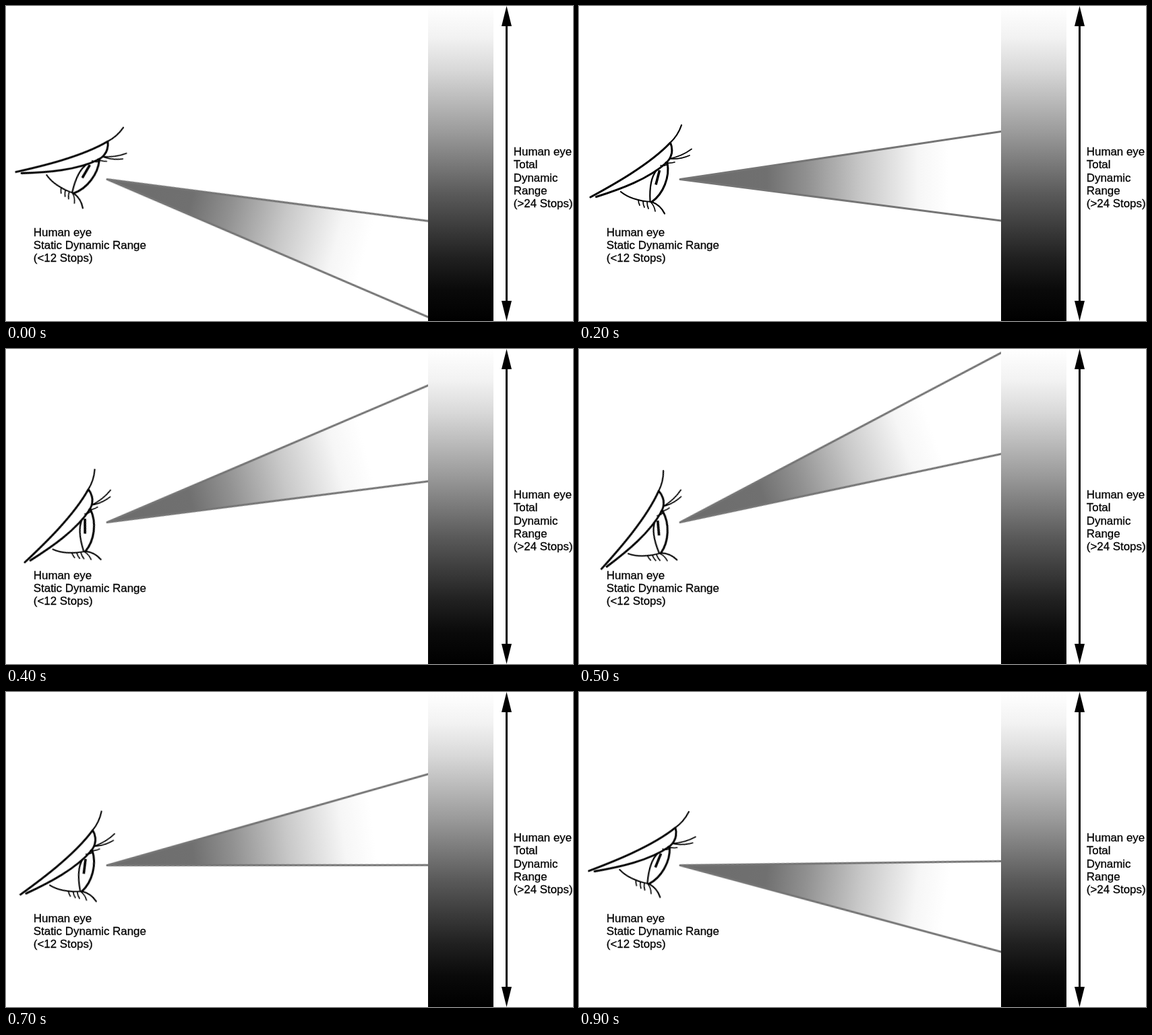
Recreate the animation shown at these times as an HTML page without scripts. Size 841 by 468 pixels, loop 1000 ms.

```html
<!DOCTYPE html>
<html lang="en">
<head>
<meta charset="utf-8">
<title>Dynamic range of the human eye</title>
<style>
  html, body { margin: 0; width: 100%; height: 100%; overflow: hidden; background: #fff; }
  svg { display: block; width: 100vw; height: 100vh; }
  text { font: 16.9px "Liberation Sans", Arial, sans-serif; stroke: #000; stroke-width: .3; }
  .gaze { transform-origin: 150px 257.5px; animation: look 1s step-end infinite; }
  .beam { stroke: #757575; stroke-width: 3; stroke-linejoin: round; }
  .eye { fill: none; stroke: #000; stroke-width: 2.2; stroke-linecap: round; stroke-linejoin: round; }
  .bold { stroke-width: 3; }
  .fine { stroke-width: 1.7; }
  .pupil { stroke-width: 3.6; stroke-linecap: butt; }
  @keyframes look {
    0%, 100% { transform: rotate(15.9deg); }
    10%, 90% { transform: rotate(7.75deg); }
    20%, 80% { transform: rotate(0deg); }
    30%, 70% { transform: rotate(-7.4deg); }
    40%, 60% { transform: rotate(-14.65deg); }
    50% { transform: rotate(-19.4deg); }
  }
</style>
</head>
<body>
<svg viewBox="0 0 841 468" preserveAspectRatio="none">
  <defs>
    <linearGradient id="glow" gradientUnits="userSpaceOnUse" x1="150" x2="565" y1="0" y2="0">
      <stop offset="0" stop-color="#6c6c6c"/>
      <stop offset=".31" stop-color="#707070"/>
      <stop offset=".45" stop-color="#909090"/>
      <stop offset=".65" stop-color="#c8c8c8"/>
      <stop offset=".85" stop-color="#f6f6f6"/>
      <stop offset=".96" stop-color="#fff"/>
    </linearGradient>
    <linearGradient id="range" x2="0" y2="1">
      <stop offset="0" stop-color="#fff"/>
      <stop offset=".1" stop-color="#f2f2f2"/>
      <stop offset=".2" stop-color="#d9d9d9"/>
      <stop offset=".4" stop-color="#9b9b9b"/>
      <stop offset=".6" stop-color="#595959"/>
      <stop offset=".8" stop-color="#202020"/>
      <stop offset=".9" stop-color="#0a0a0a"/>
      <stop offset="1" stop-color="#000"/>
    </linearGradient>
  </defs>

  <g class="gaze">
    <path class="beam" fill="url(#glow)" d="M700 175.500 150 257.500 700 328.500"/>
    <g class="eye">
      <!-- upper lid and crease -->
      <path class="bold" d="M17 284C50 266 104 236 135 203.500"/>
      <path d="M135 203.500Q147 192 152 177"/>
      <path class="bold" d="M25.500 283.500C62 272 103 257 130 232.500"/>
      <path class="bold" d="M135.500 203C139 211 138 219 136.500 222Q135 228 129 233"/>
      <!-- upper lashes -->
      <path class="fine" d="M134 227Q153 223 167 212.500M134 227Q151 228 164 222M128 233Q136 234 142 232M121 237Q126 238 130 236"/>
      <!-- iris and pupil -->
      <path class="bold" d="M131 233C135 254 125 279 108 291"/>
      <path d="M115 244C107 254 104.500 272 105.500 290"/>
      <path class="pupil" d="M119.500 244 114 265.500"/>
      <!-- lower lid and lashes -->
      <path d="M62 276C73 285 91 290 108 291Q121 296 127 308.500"/>
      <path class="fine" d="M88 288Q88 292 90 296M95 290Q95 295 97 299M101 291Q101 297 103 301M106 291Q112 297 113 305"/>
    </g>
  </g>

  <rect x="626" width="97" height="468" fill="url(#range)"/>
  <path d="M742.500 0 750 30H744V438H750L742.500 468 735 438H741V30H735Z"/>

  <text y="342">
    <tspan x="40.800">Human eye</tspan>
    <tspan x="40.800" dy="19">Static Dynamic Range</tspan>
    <tspan x="40.800" dy="19">(&lt;12 Stops)</tspan>
  </text>
  <text y="222">
    <tspan x="752.800">Human eye</tspan>
    <tspan x="752.800" dy="19.300">Total</tspan>
    <tspan x="752.800" dy="19.300">Dynamic</tspan>
    <tspan x="752.800" dy="19.300">Range</tspan>
    <tspan x="752.800" dy="19.300">(&gt;24 Stops)</tspan>
  </text>
</svg>
</body>
</html>
```
